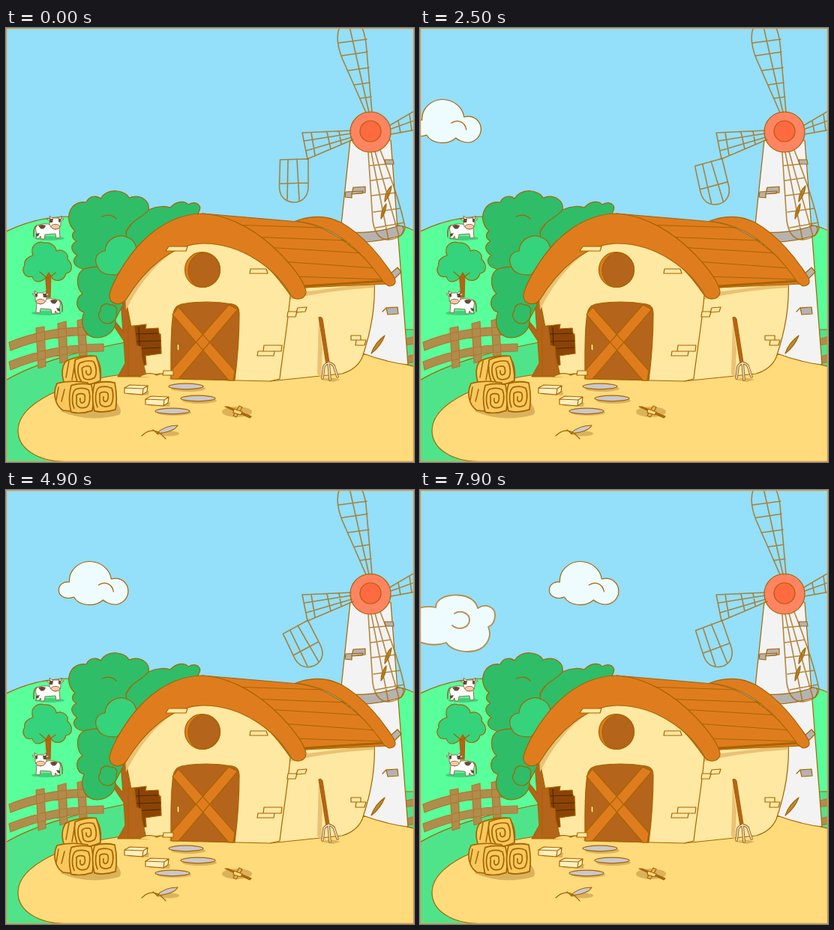
Animation of 544x580 px, one loop 8000 ms. Source, as an HTML page:

```html
<!DOCTYPE html>
<html lang="en">
<head>
<meta charset="utf-8">
<title>Farm</title>
<style>
html, body { margin: 0; width: 100%; height: 100%; overflow: hidden; }
svg { display: block; width: 544px; height: 580px; fill: none; stroke: #a86400; stroke-width: 1.2; stroke-linejoin: round; stroke-linecap: round; }
.flat { stroke: none; }
.white { fill: #eefbff; }
.grass { fill: #59ff9a; }
.dark-grass { fill: #4fe48a; }
.fence { fill: #af8d4c; stroke: #b8742f; }
.leaf { fill: #2fbd68; }
.light-leaf { fill: #35d37c; }
.wood { fill: #b5641b; }
.roof { fill: #df7d1e; }
.wall { fill: #ffe8a1; }
.shade { fill: #e9c274; stroke: none; }
.soil { fill: #dbb25c; stroke: none; }
.stone { fill: #c9c8cf; }
.grey { fill: #b5b3b0; }
.hay { fill: #f7c85c; stroke-width: 1.7; }
.mesh { stroke: #a87018; stroke-width: 1.6; stroke-opacity: .82; }
</style>
</head>
<body>
<svg viewBox="0 0 544 580">
<defs>
  <g id="cow">
    <ellipse cx="58" cy="281" rx="20" ry="3" fill="#43cf7c" class="flat"/>
    <g stroke="#8a6238" stroke-width=".9">
      <path d="M41 264Q36 266 37 279" stroke-width="1.5"/>
      <path d="M41 264Q50 260 61 263L71 267 72 280 67 281 66 275 52 276 51 282 47 282 46 278 44 281 40 281 41 274Q38 269 41 264Z" fill="#fff"/>
      <path d="M43 264Q48 262 53 264 51 270 46 268ZM40 275L45 274 43 278 40 279Z" fill="#694a35" stroke="none"/>
      <path d="M58 258L54 255 59 255 58 251 62 254H70L74 251 73 255 77 255 73 259Q74 268 66 269 57 268 58 258Z" fill="#fff"/>
      <path d="M58 255H63L62 260 58 260ZM70 254L74 256 72 260 70 259Z" fill="#694a35" stroke="none"/>
      <ellipse cx="66" cy="265.500" rx="6" ry="3.200" fill="#f8c9a5"/>
    </g>
  </g>
  <g id="baleEnd" class="hay">
    <path d="M-13-17Q0-21 14-18Q18 0 15 16Q0 21-13 18Q-18 0-13-17Z"/>
    <path d="M-9 13C-13 5-12-9-7-12Q3-15 10-11C13-4 12 7 8 11C1 14-6 12-6 6V-4C-4-7 4-7 5-4C6 1 5 6 1 6Q-2 5-1 0"/>
  </g>
</defs>

<path class="flat" fill="#94dff9" d="M0 0H544V580H0Z"/>

<path id="cloud" class="white" d="M30 123C29 106 44 95.500 57 95.500C72 95.500 84 106 86 119C99 115 108.500 125 108.500 135C108.500 146 99 153 91 153C84 153 77 149 75 147C64 157 43 155 36 143C26 147 16 142 16 134C16 126 23 122 30 123ZM69 127C76 122 87 124 89 136"/>
<path id="lowCloud" class="white" stroke="#b78c48" stroke-width="1.800" d="M-10 163C-4 157 10 154 21 157C21 145 36 140 50 140.500C66 141 75 149 77 158C87 151 100 156 100 167C100 176 96 181 91 183C97 197 88 216 64 216C52 216 40 212 35 204C24 208 8 208-10 199ZM46 165C56 159 67 166 66 175C64 185 51 188 43 181"/>

<!-- hills, fence and distant tree -->
<path class="grass" d="M-2 273Q40 252 85 252L210 300V480H-2ZM500 262L524 264Q536 266 546 272V460H500Z"/>
<path class="dark-grass" d="M-2 472C40 446 105 430 175 417V582H-2ZM520 403H546V460H520Z"/>
<g class="fence">
  <path d="M4 420Q64 396 126 401V411Q66 407 6 431ZM4 446Q64 422 130 422V432Q66 432 6 457ZM40 401L51 399 53 452 43 455ZM69 395L80 392 82 445 72 448ZM95 391L105 388 108 437 98 440ZM530 416L546 412V422L530 424ZM530 440L546 436V446L530 449Z"/>
</g>
<path class="wood" d="M52 325L55 360H59L60 324Z"/>
<path class="light-leaf" d="M36 304C31 290 43 284 51 287C61 286 67 293 67 298C76 294 84 302 82 309C90 316 89 327 80 328C77 339 67 339 62 335L57 327C50 342 37 342 35 332C25 335 20 324 25 317C23 310 31 305 36 304Z"/>
<path d="M45 326L56 335 66 327"/>
<use href="#cow"/>
<use href="#cow" transform="matrix(-1 0 0 1 112 100)"/>

<!-- sand -->
<path fill="#ffdb7b" d="M546 453L480 436 350 450 180 461C110 464 16 493 16 538C16 562 42 579 78 579.500H546Z"/>

<!-- windmill -->
<path fill="#f3f3f3" d="M459 150L447 263 458 290 470 350 476 435Q508 447 536 450L513 150Z"/>
<path class="grey" d="M444 272C475 276 506 271 524 264Q531 264 530 270L527 277C500 286 470 288 450 285Z"/>
<path class="grey" d="M463 213L479 212 479 220 461 222ZM453 219L476 218 475 221 461 222V227L452 226ZM505 176H516L517 182H506ZM507 374L522 373 523 382 509 383ZM513 328L522 320 527 326 517 336Z"/>
<path d="M505 232Q505 219 514 211Q513 223 505 232ZM500 255Q500 243 507 235Q507 246 500 255ZM487 435Q492 420 505 411Q500 425 487 435Z" fill="#b98a32"/>
<path d="M507 374L502 379"/>
<circle cx="486" cy="139" r="27" fill="#ff8461"/>
<g class="mesh">
  <path d="M480 113L448 40Q438 14 445-2M488 113L480 20Q478 6 474-2M484 113L458-2M443 20L481 15M448 37L482 32M455 57L484 53M464 76L485 73M472 94L487 92"/>
  <path d="M460 137L395 140 402 175 463 149M460 141L397 151M461 146L400 164M407 140L412 170M428 139L433 162M444 138L447 155"/>
  <path d="M512 130L546 110M513 135L546 123M513 142L546 136M523 124L526 140M538 115L541 137"/>
  <path d="M483 166L489 258Q493 283 510 283Q530 281 532 267Q526 232 499 163M487 166L510 283M492 165L524 278M484 184L506 182M486 204L513 200M488 224L520 220M490 246L526 241M493 267L531 260"/>
</g>
<circle cx="486" cy="138" r="14" fill="#ff6a40"/>
<path id="flap" class="mesh" stroke-opacity="1" d="M365.500 176L403 175 403 212C403 226 394 233 384 233C371 232 364 224 364.500 210ZM376 176L375 229M388 175L391 231M364.500 208L403 207"/>

<!-- big tree -->
<path class="wood" d="M153 365L156 405 143 389 139 391 157 418 159 448 149 466H190L176 449 170 425 160 365Z"/>
<path class="leaf" d="M160 272C169 263 164 258 190 243C203 237 214 238 219 240C228 230 239 231 243 236C254 230 262 237 257 246L235 300 160 310Z"/>
<path class="leaf" d="M102 322C90 319 87 310 95 304C85 297 86 289 94 285C86 280 88 275 92 271C76 258 84 229 107 233C111 223 122 224 126 228C136 212 160 217 164 227C181 221 192 232 190 243C183 253 165 258 160 272L165 330Z"/>
<path class="leaf" d="M104 322C92 328 94 348 102 355C90 363 94 377 104 380C97 397 106 414 122 414C139 413 147 401 146 389L156 370 150 320Q119 317 104 322Z"/>
<path class="light-leaf" d="M122 319C116 308 122 299 132 298C133 281 151 274 162 280C171 283 175 292 174 300L148 330C136 330 126 329 122 319Z"/>
<path class="leaf" d="M136 395C126 395 120 384 126 378C125 370 134 367 138 370C145 369 150 375 147 380C149 388 142 395 136 395Z"/>
<path d="M128 252Q140 247 147 255"/>

<!-- barn -->
<path class="wall" d="M375 350L491 336C493 370 487 405 475 440Q468 456 448 462L352 472Z"/>
<path class="shade" d="M379 355L490 341V347Q425 351 379 363Z"/>
<path class="wall" d="M160 364L175 440 184 465 205 462 222 469 352 472 365 469C368 440 376 395 379 357C340 300 305 280 261 280C220 283 185 325 160 364Z"/>
<path class="shade" d="M160 377C178 340 204 309 232 294L200 305 159 358Z"/>
<path fill="#8b4305" d="M163 399L187 396 186 402 203 401 204 409 206 409 207 435 186 438 187 450 178 453 168 456Z"/>
<path d="M166 409L204 408M168 419L206 418M170 429L206 427M177 400L179 450M168 404L181 455" stroke="#4e2600"/>
<path class="wood" d="M163 399L171 398 174 424 180 426 181 440 187 465H163Z"/>
<path fill="#ffdb7b" d="M178 466C187 460 197 461 201 464C208 460 219 462 224 468"/>

<path class="roof" d="M262 248L390 259C430 264 472 295 509 342L396 347Z"/>
<path d="M301 263L425 267M325 279L454 284M347 293L477 301M367 312L493 321M382 332L505 336"/>
<path d="M398 345L505 338" stroke-width="3"/>
<path class="roof" d="M386 258C408 250 429 251 447 260C477 277 502 308 518 334Q522 344 511 345Q504 342 501 336C475 300 440 263 386 258Z"/>
<path class="roof" d="M138 356C142 340 159 309 181 286C207 260 236 248 263 248C302 251 338 273 367 303C386 323 398 341 400 352C400 362 388 365 381 359C360 321 314 288 263 288C222 288 184 323 160 363C151 373 137 369 138 356Z"/>

<circle cx="262" cy="323" r="23.500" class="roof"/>
<path class="wood" d="M260 300.500A23 23 0 1 1 256 345.500C238 337 238 308 260 300.500Z"/>
<path class="wood" d="M220 468C220 438 219 404 223 382Q224 372 234 369Q267 363 302 369Q311 371 311 381C311 412 309 440 305 471Z"/>
<path class="roof" d="M222 383L230 373 305 458 303 471H297ZM297 370L309 376 230 469H220L221 457Z"/>
<path class="wall" d="M228 423Q231 421 231 425V430Q229 433 228 429Z"/>
<path class="wall" d="M217 292H242L240 298H213ZM326 322H347L349 328H325ZM344 424H368L367 432H343ZM336 432H358L357 438H335ZM210 458H223V464H209ZM376 379H388L386 386H375ZM389 374L401 373 399 379 387 380ZM460 411H473V417H460ZM467 417H480L478 424H466Z"/>

<!-- pitchfork -->
<path class="shade" d="M417 390L415 462 420 468 422 430Z"/>
<path class="wood" d="M417 387Q420 385 422 389L431 447 427 449Z"/>
<path class="soil" d="M420 470Q434 465 446 470L436 473Z"/>
<g id="fork" stroke-width="3.600">
  <path id="prongs" d="M422 468L424 452Q430 444 437 451L442 466M430 447L432 470"/>
  <use href="#prongs" stroke="#dedede" stroke-width="1.700"/>
</g>

<!-- hay -->
<path class="soil" d="M72 512L145 497Q157 512 151 517Q110 528 72 512Z"/>
<path class="hay" d="M79 446C90 439 111 437 119 439Q128 450 126 470L94 475 77 473Q72 457 79 446Z"/>
<path d="M84 445L80 467M92 447L88 470" stroke-width="1.500"/>
<use href="#baleEnd" transform="translate(108 458) rotate(-8) scale(1.050 .98)"/>
<path class="hay" d="M68 475C82 471 97 472 109 474L105 514 76 511C65 504 62 487 68 475Z"/>
<path d="M70 480L67 497M78 483L74 499" stroke-width="1.500"/>
<use href="#baleEnd" transform="translate(100 495) scale(1 1.020)"/>
<use href="#baleEnd" transform="translate(131 493) scale(1 1.050)"/>

<!-- bricks, stones and sticks -->
<path class="soil" d="M160 490L191 485 190 491ZM188 505L219 500 218 506Z"/>
<path id="brick" fill="#fff0bd" d="M158 481L165 477 189 478 183 482ZM158 481L183 482 182 490 158 488ZM183 482L189 478 188 486 182 490Z"/>
<use href="#brick" x="28" y="15"/>
<g class="soil"><ellipse cx="243" cy="482" rx="23" ry="4"/><ellipse cx="258" cy="498" rx="23" ry="4"/><ellipse cx="224" cy="514" rx="23" ry="4"/><ellipse cx="217" cy="542" rx="14" ry="3.500"/><ellipse cx="308" cy="513" rx="20" ry="7"/></g>
<g class="stone"><ellipse cx="240" cy="479" rx="23" ry="3.800"/><ellipse cx="256" cy="495" rx="23" ry="3.800"/><ellipse cx="222" cy="512" rx="23" ry="3.800"/><path d="M201 542Q211 531 229 531Q224 540 201 542Z"/></g>
<path d="M181 545Q193 533 206 542L213 549M196 537L203 543"/>
<path fill="#e7b65d" d="M303 518L311 505 315 507 307 520Z"/>
<path class="wood" d="M292 506L296 506 327 519 325 521Z"/>
<path fill="#ffdb7b" d="M304 509L315 513 313 517 303 514Z"/>

<path stroke="#d39a4a" stroke-width="1.400" d="M.5 .5H543.500V579.500H.5Z"/>
</svg>
<script>
const [cloud, lowCloud, flap] = ["cloud", "lowCloud", "flap"].map(id => document.getElementById(id));
const PERIOD = 8000, STEP = 100, WIND = 0.034, TURN = 6000;

function draw() {
  const t = Math.floor(performance.now() % PERIOD / STEP) * STEP;
  // The loose sail swings out, then falls back a little faster.
  const angle = t < TURN ? t * 0.0055 : 33 - (t - TURN) * 0.0073;
  cloud.setAttribute("transform", `translate(${(t - 3300) * WIND})`);
  lowCloud.setAttribute("transform", `translate(${(t - 7900) * WIND})`);
  flap.setAttribute("transform", `rotate(${-angle} 401 176)`);
  requestAnimationFrame(draw);
}
draw();
</script>
</body>
</html>
```
